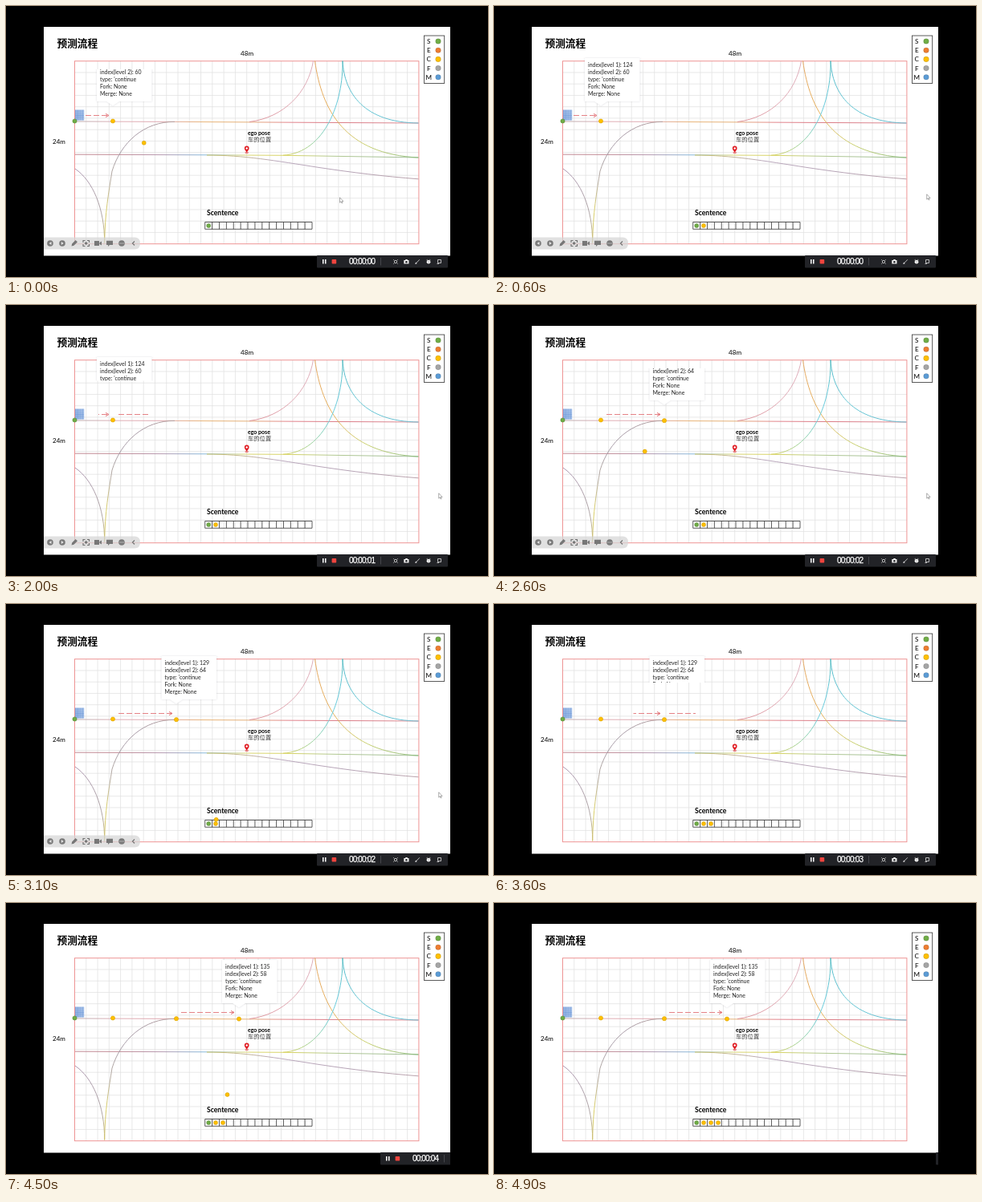
An HTML page that plays this animation: 600x338 px, repeating every 5000 ms.

```html
<!DOCTYPE html>
<html lang="zh-CN">
<head>
<meta charset="utf-8">
<style>
html, body { margin: 0; width: 100%; height: 100%; overflow: hidden; background: #000; }
svg { display: block; width: 600px; height: 338px; font-family: Lato, "Noto Sans CJK SC", sans-serif; }
.cjk { font-family: "Noto Sans CJK SC", "Noto Sans CJK", sans-serif; }
.curve { fill: none; stroke-width: .95; }
.pop { filter: drop-shadow(0 .6px 1px rgba(90, 90, 110, .22)); }
.clock { font: 10px "Liberation Sans", sans-serif; letter-spacing: -.85px; stroke: #fff; stroke-width: .25; }
</style>
</head>
<body>
<svg id="stage" viewBox="0 0 600 338">
  <defs>
    <clipPath id="slide"><rect x="47" y="26" width="506" height="312"/></clipPath>
    <pattern id="mesh" x="86" y="129.5" width="2.2" height="2.2" patternUnits="userSpaceOnUse">
      <rect width="2.2" height="2.2" fill="#c0d3ef"/><path d="M0 .5H2.2M.5 0V2.2" stroke="#6b97d8" stroke-width=".75"/>
    </pattern>
  </defs>
  <rect width="600" height="338"/>
  <rect x="47" y="26" width="506" height="285.5" fill="#fff"/>
  <text class="cjk" x="63.5" y="51" font-size="12.7" font-weight="bold">预测流程</text>
  <text x="292" y="61.6" font-size="8.1">48m</text>
  <text x="58" y="171.5" font-size="8">24m</text>
  <g id="plot"></g>
  <rect x="86" y="129.5" width="11.2" height="13.2" fill="url(#mesh)"/>
  <text x="301" y="160.7" font-size="7" font-weight="bold">ego pose</text>
  <text class="cjk" x="301" y="169.2" font-size="7.3" fill="#444">车的位置</text>
  <g id="pin" transform="translate(0 -.5)">
    <ellipse cx="299.7" cy="183.4" rx="2" ry=".8" fill="none" stroke="#d22" stroke-width=".6"/>
    <path d="M299.7 183.5C299 181.5 296.8 180 296.8 178a2.9 2.9 0 0 1 5.8 0C302.6 180 300.4 181.5 299.7 183.5Z" fill="#e01b22"/>
    <circle cx="299.7" cy="178" r="1.2" fill="#fff"/>
  </g>
  <text x="250" y="261.4" font-size="8.6" font-weight="bold">Scentence</text>
  <g id="cells"></g>
  <g id="legend"></g>
  <g id="steps"></g>
  <g id="tools"></g>
  <path id="cursor" d="M0 0V6.4L1.5 5 2.5 7.2 3.4 6.8 2.5 4.7H4.4Z" fill="#fff" stroke="#777" stroke-width=".6"/>
  <g clip-path="url(#slide)"><g id="bar"></g></g>
</svg>
<script>
const LOOP = 5000, TICK = 100, WIPE = 500, FLY = 1000;
const POP_TOP = 64, POP_BOTTOM = 132;
const GREEN = '#70ad47', GOLD = '#ffc000';
const $ = id => document.getElementById(id);

function add(parent, tag, attrs = {}, text) {
  const el = document.createElementNS('http://www.w3.org/2000/svg', tag);
  for (const k in attrs) el.setAttribute(k, attrs[k]);
  if (text) el.textContent = text;
  return parent.appendChild(el);
}
const set = (el, attrs) => { for (const k in attrs) el.setAttribute(k, attrs[k]); };
const show = (el, on) => el.setAttribute('visibility', on ? 'visible' : 'hidden');
const clamp = v => Math.max(0, Math.min(1, v));
const dot = (parent, cx, cy, r, fill, stroke = 'none') =>
  add(parent, 'circle', { cx, cy, r, fill, stroke, 'stroke-width': .5 });

// Grid, frame and lanes
const plot = $('plot');
const LEFT = 85.5, TOP = 68.7, WIDTH = 428.4, HEIGHT = 228;
let grid = '';
for (let i = 1; i < 30; i++) grid += `M${LEFT + i * WIDTH / 30} ${TOP}v${HEIGHT}`;
for (let i = 1; i < 16; i++) grid += `M${LEFT} ${TOP + i * HEIGHT / 16}h${WIDTH}`;
add(plot, 'path', { d: grid, stroke: '#e0e0e0', 'stroke-width': .75 });
add(plot, 'rect', { x: LEFT, y: TOP, width: WIDTH, height: HEIGHT, fill: 'none', stroke: '#ee9494' });

// Each lane: path, gradient axis, colours
const lanes = [
  ['M86 144L210 144.4 513.5 146', [86, 144, 513, 144], '#b8a9ac #dfabb2 #dda5ad #e7b070 #e3ab70 #e07c86 #d9747f #d97b86 #d9848c'],
  ['M86 185.2L250 185.8 345 186.3 513.5 189', [86, 185, 513, 185], '#bf8590 #bf8590 #b394ab #7fb3d8 #d7d36a #d6d15c #adc58a #a3bf90 #9dbb95'],
  ['M250 186C296 186 335 193 390 201.500C430 207.500 470 212.500 513.500 215.800', [250, 186, 513, 186], '#c9c05c #b7a4ba #b29fb2 #b59ca6'],
  ['M303 144.5C346 139 376 108 382.500 68.500', [303, 144, 382, 68], '#dd8f97 #dfa5b0 #dba9b7'],
  ['M384.500 68.500C393 130 422 185 513.500 189', [384, 68, 513, 189], '#e2a25a #e5ab50 #c9cf69 #86b979'],
  ['M419 68.500C421 109 446 145.500 513.500 146', [419, 68, 513, 146], '#4fb9c9 #5cc3d2 #62b9cf'],
  ['M419 68.500C420 118 398 183 345 186.200', [419, 68, 345, 186], '#4fb9b9 #5cc5d6 #62cadb #8fcf9f #d6d15c'],
  ['M210 144.400C172 144 143 170 132 206C128 232 123 258 122.700 295.500', [210, 144, 123, 296], '#b09a9a #a697a3 #a399a3 #b2a79b #d8cd62 #cdbf62'],
  ['M86 203C108 218 122.700 252 122.700 295.500', [86, 203, 123, 296], '#a890ac #a898a5 #aaa0a0 #d0c268']
];
lanes.forEach(([d, [x1, y1, x2, y2], colors], i) => {
  const grad = add(plot, 'linearGradient', { id: 'lane' + i, gradientUnits: 'userSpaceOnUse', x1, y1, x2, y2 });
  colors.split(' ').forEach((c, k, all) => add(grad, 'stop', { offset: k / (all.length - 1), 'stop-color': c }));
  add(plot, 'path', { d, class: 'curve', stroke: `url(#lane${i})` });
});

// Sentence cells
let cells = 'M247.700 269.500H381V278.300H247.700Z';
for (let i = 1; i < 15; i++) cells += `M${247.7 + i * 8.887} 269.500v8.800`;
add($('cells'), 'path', { d: cells, fill: 'none', stroke: '#333', 'stroke-width': .8 });
dot($('cells'), 252.2, 274, 2.5, GREEN, '#507e32');

// Legend
add($('legend'), 'rect', { x: 520.5, y: 37, width: 25.2, height: 59.5, fill: '#fff', stroke: '#333', 'stroke-width': .8 });
[['S', GREEN], ['E', '#ed7d31'], ['C', GOLD], ['F', '#a5a5a5'], ['M', '#5b9bd5']].forEach(([name, color], i) => {
  const y = 44 + i * 11.2;
  add($('legend'), 'text', { x: 526.3, y: y + 2.9, 'font-size': 8.1, 'text-anchor': 'middle' }, name);
  dot($('legend'), 538, y, 3.3, color, 'rgba(0,0,0,.25)');
});

// Prediction steps
const steps = [
  { node: [133, 143.5], arrow: [99, 128], left: 113, drop: 0, ids: [124, 60], via: [187, 171], cell: 261, arrive: -900, pop: -390, leave: 1725 },
  { node: [212, 144.2], arrow: [140, 207], left: 193.5, drop: 0, ids: [129, 64], via: [143, 197], cell: 270, arrive: 1725, pop: 2210, leave: 3350 },
  { node: [290, 144.6], arrow: [218, 284], left: 269, drop: 6, ids: [135, 58], via: [267.600, 199], cell: 279, arrive: 3350, pop: 3820, leave: LOOP }
];

function clipped(id) {
  const rect = add(add($('steps'), 'clipPath', { id }), 'rect');
  return [rect, add($('steps'), 'g', { 'clip-path': `url(#${id})` })];
}

steps.forEach((s, i) => {
  const [a, b] = s.arrow, x = s.node[0], l = s.left, r = l + 68.5;
  const [arrowClip, arrow] = clipped('arrow' + i);
  add(arrow, 'path', { d: `M${a} 136.500H${b}`, stroke: '#e47c80', 'stroke-dasharray': '7 3', 'stroke-width': .95 });
  add(arrow, 'path', { d: `M${b - 4} 134.400L${b} 136.500 ${b - 4} 138.600`, fill: 'none', stroke: '#e06a70', 'stroke-width': .95 });
  const [popClip, pop] = clipped('pop' + i);
  const box = add(pop, 'g', { transform: `translate(0 ${s.drop})` });
  add(box, 'path', { class: 'pop', fill: '#fff', d: `M${l} 65H${r}V119H${x + 8}L${x} 124.500 ${x - 8} 119H${l}Z` });
  [`index(level 1): ${s.ids[0]}`, `index(level 2): ${s.ids[1]}`, "type: 'continue", 'Fork: None', 'Merge: None']
    .forEach((line, k) => add(box, 'text', { x: l + 4, y: 76.2 + k * 8.9, 'font-size': 6.95, fill: '#222' }, line));
  Object.assign(s, { arrowClip, popClip });
});
dot($('steps'), 85.5, 143.5, 2.6, GREEN, '#507e32');
for (const s of steps) {
  s.mark = dot($('steps'), ...s.node, 2.6, GOLD, '#d29d00');
  s.mover = dot($('steps'), ...s.node, 2.5, GOLD, '#c99700');
}

// Slide show tools
const tools = $('tools');
add(tools, 'path', { d: 'M47 288.500H160Q167 288.500 167 296T160 303.500H47Z', fill: '#d6d6d6', opacity: .72 });
for (const x of [55, 70, 144]) dot(tools, x, 296, 3.8, '#7a7a7a');
add(tools, 'path', { fill: '#e4e4e4', d: 'M56.500 294V298L53.500 296ZM68.800 294V298L71.800 296ZM141.500 295.500h1v1h-1zm2 0h1v1h-1zm2 0h1v1h-1z' });
add(tools, 'path', { fill: '#777', d: 'M81.500 299.500L82.200 296.500 86.500 292 89 294.300 84.500 298.800ZM110 293H116V299H110ZM116.500 295L119 293.500V298.500L116.500 297ZM125 292.800H133V298H129L127 300V298H125Z' });
add(tools, 'path', { fill: 'none', stroke: '#707070', 'stroke-width': 1.1, d: 'M96 295V292.500H98.500M101 292.500H103.500V295M103.500 297V299.500H101M98.500 299.500H96V297M160 293.500L157.500 296 160 298.500' });
dot(tools, 99.7, 296, 1.8, '#777');

// Recorder bar
const bar = $('bar');
add(bar, 'rect', { x: 387, y: 311, width: 163, height: 15.5, rx: 1, fill: '#222327' });
add(bar, 'path', { d: 'M394 316h1.500v5.500h-1.500zm3 0h1.500v5.500h-1.500z', fill: '#fff' });
add(bar, 'rect', { x: 405.6, y: 316, width: 5.6, height: 5.6, rx: .8, fill: '#f0443e' });
const clock = add(bar, 'text', { class: 'clock', x: 427, y: 322.4, fill: '#fff' }, '00:00:00');
add(bar, 'path', { d: 'M466.500 314V323.500', stroke: '#45464b' });
add(bar, 'path', { fill: 'none', stroke: '#ddd', 'stroke-width': .8, d: 'M482.300 316.300L483.300 317.300M487.700 316.300L486.700 317.300M487.700 321.700L486.700 320.700M482.300 321.700L483.300 320.700M510.500 320.800L514.800 316.300M537.500 316.500H541.500V320.500H537.500ZM536.500 321.500H539' });
add(bar, 'circle', { cx: 485, cy: 319, r: 1.7, fill: 'none', stroke: '#ddd', 'stroke-width': .8 });
add(bar, 'path', { fill: '#eee', d: 'M495.300 317H497L497.500 316H499.500L500 317H501.500V321.600H495.300ZM509.300 322L510 319.500 511.700 321.200Z' });
dot(bar, 498.4, 319.2, 1.2, '#222327');
dot(bar, 526, 319.2, 2.4, '#eee');
add(bar, 'path', { d: 'M523.300 317L525 316M527 316L528.700 317M526 318V319.500H527', fill: 'none', stroke: '#aaa', 'stroke-width': .7 });

const seconds = [1600, 2500, 3400, 4200];
const slide = [[4000, 0], [4100, 4], [4200, 16], [4900, 163]];

function track(keys, t) {
  if (t <= keys[0][0]) return keys[0][1];
  const k = keys.findIndex(key => key[0] >= t);
  if (k < 0) return keys[keys.length - 1][1];
  const [t0, v0] = keys[k - 1], [t1, v1] = keys[k];
  return v0 + (v1 - v0) * (t - t0) / (t1 - t0);
}

function drawStep(s, t) {
  const into = start => clamp((t - start) / WIPE);
  const out = into(s.leave);
  const [a, b] = s.arrow, w = b - a + 2;
  const from = a - 1 + w * out, to = a - 1 + w * into(s.arrive);
  set(s.arrowClip, { x: from, y: 132, width: Math.max(0, to - from), height: 9 });

  const h = POP_BOTTOM - POP_TOP;
  const top = POP_BOTTOM - h * into(s.pop), bottom = POP_BOTTOM - h * out;
  set(s.popClip, { x: s.left - 4, y: top + s.drop, width: 78, height: Math.max(0, bottom - top) });

  show(s.mark, t >= s.pop);
  show(s.mover, t >= s.pop);
  const p = clamp((t - s.pop) / FLY), e = p * p * (3 - 2 * p);
  const bend = (p0, c, p1) => (1 - e) ** 2 * p0 + 2 * e * (1 - e) * c + e * e * p1;
  set(s.mover, { cx: bend(s.node[0], s.via[0], s.cell), cy: bend(s.node[1], s.via[1], 274) });
}

function draw(t) {
  for (const s of steps) drawStep(s, t);
  const active = t < 1050 || (t >= 1800 && t < 3150);
  show(tools, active);
  show($('cursor'), active);
  const m = clamp((t - 100) / 400);
  $('cursor').setAttribute('transform', `translate(${415.5 + 123.2 * m} ${238.8 - 4 * m})`);
  clock.textContent = '00:00:0' + seconds.filter(s => s <= t).length;
  bar.setAttribute('transform', `translate(${track(slide, t)} 0)`);
}

const begin = performance.now();
function frame() {
  const t = (performance.now() - begin) % LOOP;
  draw(Math.floor(t / TICK) * TICK);
  requestAnimationFrame(frame);
}
frame();
</script>
</body>
</html>
```
